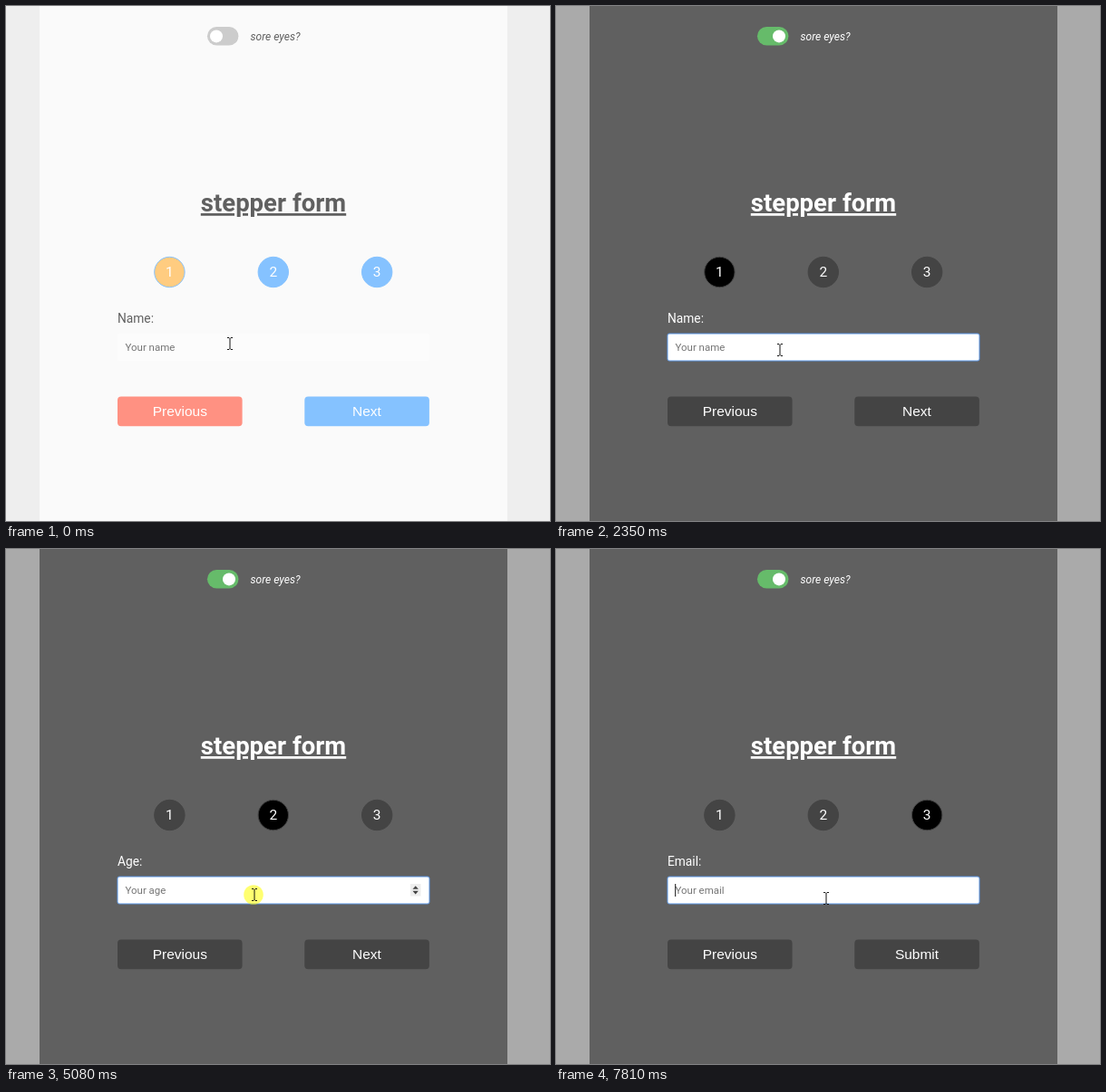
These frames come from a looping animation (600 px wide and 569 px high, 8 s). An HTML page:

```html
<!DOCTYPE html>
<html lang="en">
<head>
<meta charset="utf-8">
<title>Stepper form</title>
<style>
html, body { margin: 0; width: 100%; height: 100%; overflow: hidden; }
svg {
  display: block; width: 600px; height: 569px;
  font-family: Roboto, sans-serif;
  --side: #eeeeee; --page: #fafafa; --ink: #606060; --field: #fcfcfc;
  --main: #85c2ff; --back: #ff9182; --on: #ffcc80; --hover: #85c2ff;
}
svg.dark {
  --side: #aaaaaa; --page: #606060; --ink: #ffffff; --field: #ffffff;
  --main: #444444; --back: #444444; --on: #000000; --hover: #505050;
}
.side { fill: var(--side); }
.page { fill: var(--page); }
.ink { fill: var(--ink); }
.step circle { fill: var(--main); stroke: var(--main); }
.step.on circle { fill: var(--on); }
.step text { fill: #fff; font-size: 15.5px; text-anchor: middle; }
.button { font: 15.48px "Liberation Sans", Arial, sans-serif; fill: #fff; text-anchor: middle; }
#field { fill: var(--field); }
#field.focus { stroke: #5c97e6; }
#value { font-size: 11.47px; }
#knob { fill: #fff; }
#next { fill: var(--main); }
#next.hover { fill: var(--hover); }
</style>
</head>
<body>
<svg id="stage" viewBox="0 0 600 569">
  <rect class="side" width="600" height="569"/>
  <rect class="page" x="37" width="516" height="569"/>

  <rect id="track" x="222" y="23" width="34.4" height="20.6" rx="10.3"/>
  <circle id="knob" cx="232" cy="33.4" r="7"/>
  <text class="ink" x="269.5" y="38" font-size="12.04" font-style="italic">sore eyes?</text>

  <text class="ink" x="295" y="227" font-size="27.52" font-weight="700" text-anchor="middle" text-decoration="underline">stepper form</text>

  <g class="step" transform="translate(180.4 294)"><circle r="16.7"/><text y="5.4">1</text></g>
  <g class="step" transform="translate(294.8 294)"><circle r="16.7"/><text y="5.4">2</text></g>
  <g class="step" transform="translate(409.2 294)"><circle r="16.7"/><text y="5.4">3</text></g>

  <text id="label" class="ink" x="123" y="350" font-size="13.76"></text>
  <rect id="field" x="123" y="362" width="344" height="30" rx="2"/>
  <text id="value" x="131.5" y="381"></text>
  <rect id="caret" y="370" width="1" height="14" fill="#111"/>
  <g id="spinner">
    <rect x="446" y="370" width="11.5" height="13.5" fill="#eee"/>
    <path d="M448.5 375.8l3.2-3.6 3.2 3.6zM448.5 377.8l3.2 3.6 3.2-3.6z" fill="#444"/>
  </g>

  <rect x="123" y="431.5" width="137.6" height="32.7" rx="4" fill="var(--back)"/>
  <text class="button" x="191.8" y="453">Previous</text>
  <rect id="next" x="329.3" y="431.5" width="137.6" height="32.7" rx="4"/>
  <rect id="ring" x="329" y="431.5" width="138.4" height="33" fill="none" stroke="#4f90d6" stroke-width="1.4"/>
  <text id="nextText" class="button" x="398" y="453"></text>

  <circle id="click" r="10.8" fill="#ff0" fill-opacity=".56"/>
  <g id="cursor" fill="#fff" stroke="#111">
    <path id="arrow" d="M0 0V15L3.5 11.8 6 17.5 8.3 16.5 5.8 11H10.5Z"/>
    <path id="hand" d="M-1.5 1.5Q0-1 1.5 1.5V7Q3 5.5 4.3 7.3 6 6 7 8 8.8 7 9.5 9V13L7.5 16.5V19.5H-1V17L-5.5 11Q-5.5 8.5-3 9.5L-1.5 11Z"/>
    <path id="beam" fill="none" d="M-3-6.5H-1L0-5.5 1-6.5H3M0-5.5V5.5M-3 6.5H-1L0 5.5 1 6.5H3"/>
  </g>
</svg>
<script>
const LOOP = 8000, DARK = 970;
const $ = id => document.getElementById(id);
const show = (id, on) => { $(id).style.display = on ? '' : 'none'; };
const within = (t, spans) => spans.some(([a, b]) => t >= a && t < b);

// time, x, y of the pointer
const path = [
  [0, 247, 373], [130, 247, 373], [400, 272, 200], [700, 238, 33], [1040, 238, 33],
  [1480, 247, 390], [1660, 247, 390], [1750, 247, 380], [3550, 247, 380],
  [3900, 345, 466], [4080, 338, 459], [4620, 338, 459], [5000, 274, 382],
  [6660, 274, 382], [6790, 350, 450], [7350, 350, 450], [7600, 298, 386], [LOOP, 298, 386]
];
const clicks = [[800, 950], [1700, 1850], [4130, 4270], [5050, 5180], [6970, 7090], [7650, 7780]];
const fieldFocus = [[1720, 4130], [5080, 6970], [7680, LOOP]];
const nextFocus = [[4130, 5080], [6970, 7680]];
const caretStarts = [1850, 5140, 7680];
const steps = [
  { start: 0, label: 'Name:', hint: 'Your name', text: 'Patryk', keys: [2530, 2680, 2810, 2960, 3050, 3140], next: 'Next' },
  { start: 4290, label: 'Age:', hint: 'Your age', text: '31', keys: [6000, 6430], next: 'Next' },
  { start: 7120, label: 'Email:', hint: 'Your email', text: '', keys: [], next: 'Submit' }
];
const resets = [...caretStarts, ...steps.flatMap(s => s.keys)];
const dots = document.querySelectorAll('.step');

function pointer(t) {
  const i = path.findIndex(p => p[0] > t);
  const [t0, x0, y0] = path[i - 1], [t1, x1, y1] = path[i];
  const u = (t - t0) / (t1 - t0), k = u * u * (3 - 2 * u);
  return [x0 + (x1 - x0) * k, y0 + (y1 - y0) * k];
}

const inBox = (x, y, l, top, r, b) => x >= l && x <= r && y >= top && y <= b;
const mix = (a, b, k) => `rgb(${a.map((v, i) => Math.round(v + (b[i] - v) * k))})`;

function drawToggle(t) {
  const u = Math.min(1, Math.max(0, (t - DARK) / 400));
  const k = u * u * (3 - 2 * u);
  $('track').style.fill = mix([204, 204, 204], [102, 187, 106], k);
  $('knob').setAttribute('cx', 232 + 14 * k);
}

function drawField(t, step, hovered) {
  const focus = within(t, fieldFocus);
  const typed = step.text.slice(0, step.keys.filter(k => k <= t).length);
  const value = $('value');
  value.textContent = typed || step.hint;
  value.style.fill = typed ? '#222' : '#757575';
  $('field').classList.toggle('focus', focus);
  $('label').textContent = step.label;
  show('spinner', step === steps[1] && (focus || hovered));

  const last = Math.max(...resets.filter(r => r <= t));
  show('caret', focus && (t - last) % 1000 < 500);
  $('caret').setAttribute('x', 131.2 + (typed ? value.getComputedTextLength() : 0));
}

function drawPointer(t, x, y, kind) {
  $('cursor').setAttribute('transform', `translate(${x} ${y})`);
  for (const id of ['arrow', 'hand', 'beam']) show(id, id === kind);
  show('click', within(t, clicks));
  $('click').setAttribute('cx', x - 1);
  $('click').setAttribute('cy', y);
}

function draw(t) {
  const index = steps.findLastIndex(s => s.start <= t), step = steps[index];
  const [x, y] = pointer(t);
  const overField = inBox(x, y, 123, 362, 467, 392);
  const overNext = inBox(x, y, 329, 431, 467, 464);
  const overToggle = inBox(x, y, 222, 23, 256, 44);

  $('stage').classList.toggle('dark', t >= DARK);
  dots.forEach((d, i) => d.classList.toggle('on', i === index));
  drawToggle(t);
  drawField(t, step, overField);
  $('next').classList.toggle('hover', overNext);
  $('nextText').textContent = step.next;
  show('ring', within(t, nextFocus));
  drawPointer(t, x, y, overField ? 'beam' : overNext || overToggle ? 'hand' : 'arrow');
}

function tick() {
  draw(performance.now() % LOOP);
  requestAnimationFrame(tick);
}
tick();
</script>
</body>
</html>
```
